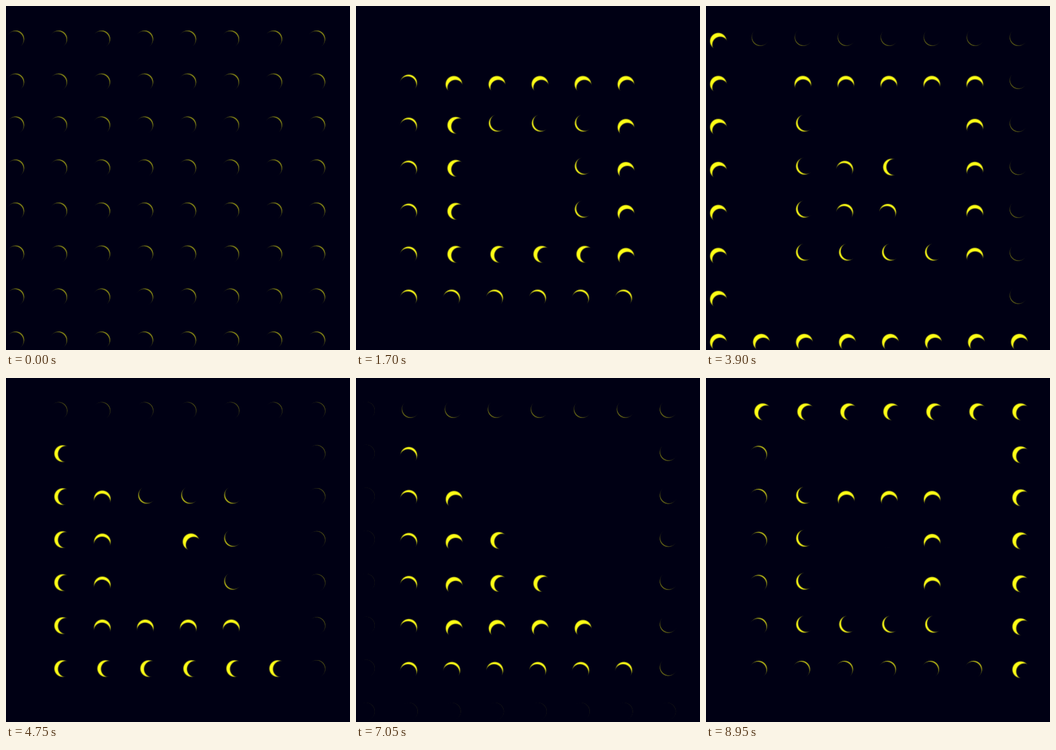
Animation, 550 px wide and 550 px high, one loop 9 s. Source, as an HTML page with a canvas:

```html
<!DOCTYPE html>
<html lang="en">
<head>
<meta charset="utf-8">
<title>Crescents</title>
<style>
html, body { margin: 0; width: 100%; height: 100%; overflow: hidden; background: #000014; }
canvas { display: block; }
</style>
</head>
<body>
<canvas id="stage" width="550" height="550"></canvas>
<script>
const SIZE = 550, COUNT = 8, CELL = SIZE / COUNT;
const LOOP = 9000, STEP = 50, SPEED = 0.0005; // radians per ms
const RADIUS = 14.2, SOFT = 2.15, REACH = 22;
const BRIGHT_SHIFT = 3.8, DARK_SHIFT = 8.2, DARK_SHRINK = 1.7;
const ORIGIN = { x: 16.9, y: 51.4 };
const BACK = [0, 0, 20], LIGHT = [255, 255, 22];

const ctx = document.getElementById('stage').getContext('2d');
const image = ctx.createImageData(SIZE, SIZE);

// Coverage of a disc whose edge fades from 1 to 0 just inside the radius
function disc(dx, dy, radius) {
  return Math.min(1, Math.max(0, (radius - Math.hypot(dx, dy)) / SOFT));
}

function clear() {
  for (let p = 0; p < image.data.length; p += 4) {
    image.data.set(BACK, p);
    image.data[p + 3] = 255;
  }
}

// A bright disc partly hidden by a dark one that moves further and shrinks
function crescent(cx, cy, phase) {
  const swing = 0.5 - Math.sin(phase);
  if (swing <= 0) return;
  const ux = swing * Math.cos(phase - Math.PI / 4);
  const uy = swing * Math.sin(phase - Math.PI / 4);
  const darkRadius = RADIUS + SOFT - DARK_SHRINK * swing;
  const x0 = Math.max(0, Math.floor(cx - REACH)), x1 = Math.min(SIZE, cx + REACH);
  const y0 = Math.max(0, Math.floor(cy - REACH)), y1 = Math.min(SIZE, cy + REACH);
  for (let y = y0; y < y1; y++) {
    for (let x = x0; x < x1; x++) {
      const dx = x + 0.5 - cx, dy = y + 0.5 - cy;
      const bright = disc(dx + BRIGHT_SHIFT * ux, dy + BRIGHT_SHIFT * uy, RADIUS);
      if (bright === 0) continue;
      const dark = disc(dx + DARK_SHIFT * ux, dy + DARK_SHIFT * uy, darkRadius);
      const lit = bright * (1 - dark);
      const p = (y * SIZE + x) * 4;
      for (let c = 0; c < 3; c++) image.data[p + c] = BACK[c] + (LIGHT[c] - BACK[c]) * lit;
    }
  }
}

function draw() {
  const time = Math.floor(performance.now() % LOOP / STEP) * STEP;
  clear();
  for (let row = 0; row < COUNT; row++) {
    for (let col = 0; col < COUNT; col++) {
      // Outer rings turn faster; each ring has two halves
      const ring = Math.min(row, col, COUNT - 1 - row, COUNT - 1 - col);
      const rate = 9 - 2 * ring - (col > row ? 1 : 0);
      crescent(ORIGIN.x + col * CELL, ORIGIN.y + row * CELL, rate * time * SPEED);
    }
  }
  ctx.putImageData(image, 0, 0);
  requestAnimationFrame(draw);
}
draw();
</script>
</body>
</html>
```
